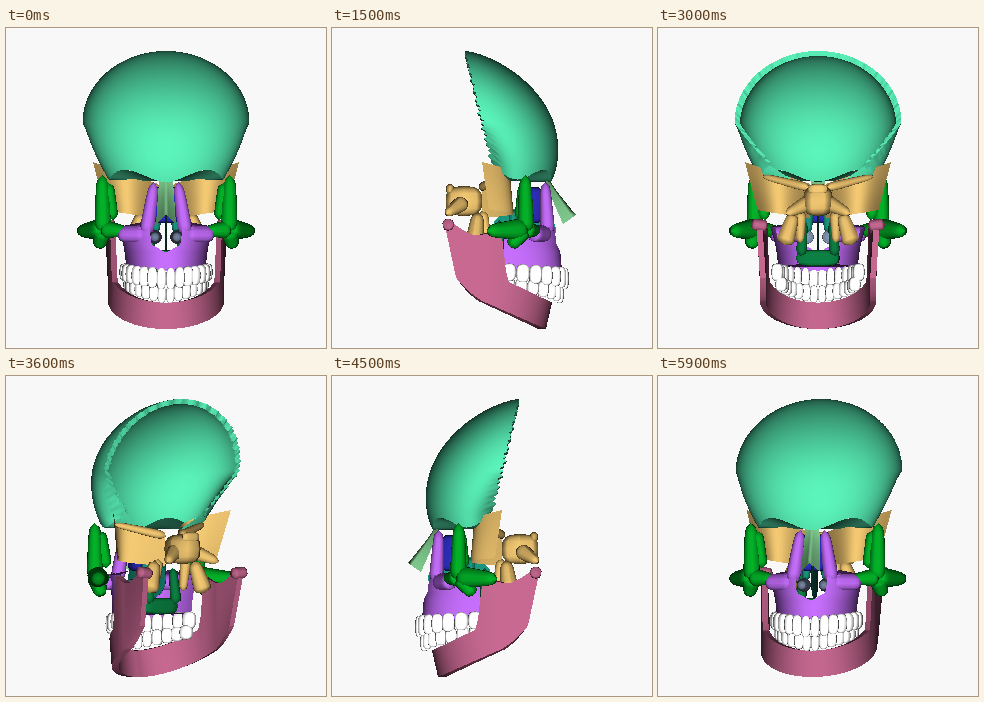
These frames come from a looping animation (320 by 320 pixels, 6 s). An HTML page with a canvas:

```html
<!DOCTYPE html>
<html>
<head>
<meta charset="utf-8">
<style>
html, body { margin: 0; width: 100%; height: 100%; overflow: hidden; background: #f8f8f8; }
canvas { display: block; width: 320px; height: 320px; }
</style>
</head>
<body>
<canvas id="stage" width="320" height="320"></canvas>
<script>
const SIZE = 320, STEPS = 60, STEP_MS = 100, QUARTER = Math.PI / 2;
const ctx = document.getElementById('stage').getContext('2d');
const image = ctx.createImageData(SIZE, SIZE);
const pixels = new Uint32Array(image.data.buffer);
const depth = new Float32Array(SIZE * SIZE);

const TEAL = [92, 245, 188], TAN = [246, 203, 116], GREEN = [4, 182, 42], PURPLE = [200, 112, 255],
  ROSE = [200, 106, 146], NAVY = [46, 46, 185], SAGE = [146, 230, 162], PALATINE = [14, 130, 68],
  SLATE = [150, 170, 205], VOMER = [28, 150, 128], IVORY = [340, 340, 340];

const vertices = [], triangles = [];
const { sin, cos, hypot, abs, min, max, sqrt, PI } = Math;
const lerp = (a, b, t) => a + (b - a) * t;
const mix = (p, q, t) => p.map((a, i) => lerp(a, q[i], t));
const ramp = (v, from, to) => max(0, min(1, (v - from) / (to - from)));
const flip = ([x, y, z]) => [-x, y, z];
const cross = (p, q) => [p[1] * q[2] - p[2] * q[1], p[2] * q[0] - p[0] * q[2], p[0] * q[1] - p[1] * q[0]];
const unit = p => { const len = hypot(...p) || 1; return p.map(v => v / len); };

function addTriangle(color, a, b, c) {
  const normal = cross([b.x - a.x, b.y - a.y, b.z - a.z], [c.x - a.x, c.y - a.y, c.z - a.z]);
  for (const p of [a, b, c]) p.normal = p.normal.map((v, i) => v + normal[i]);
  triangles.push({ color, a, b, c });
}

// Grid mesh of a parametric surface
function surface(color, nu, nv, place) {
  const grid = [], first = vertices.length;
  for (let i = 0; i <= nu; i++) {
    grid.push([]);
    for (let j = 0; j <= nv; j++) {
      const [x, y, z] = place(i / nu, j / nv);
      grid[i].push({ x, y, z, normal: [0, 0, 0] });
    }
    vertices.push(...grid[i]);
  }
  for (let i = 0; i < nu; i++) for (let j = 0; j < nv; j++) {
    addTriangle(color, grid[i][j], grid[i + 1][j], grid[i + 1][j + 1]);
    addTriangle(color, grid[i][j], grid[i + 1][j + 1], grid[i][j + 1]);
  }
  for (const p of vertices.slice(first)) p.normal = unit(p.normal);
}

function pair(color, nu, nv, place) {
  surface(color, nu, nv, place);
  surface(color, nu, nv, (u, v) => flip(place(u, v)));
}

// Superellipsoid; a low power makes it boxy
function blob(color, [cx, cy, cz], [rx, ry, rz], power = 1, turn = 0) {
  const soft = v => Math.sign(v) * abs(v) ** power;
  surface(color, 10, 8, (u, v) => {
    const a = u * PI * 2, b = (v - 0.5) * PI;
    const x = rx * soft(cos(a)) * soft(cos(b)), z = rz * soft(sin(a)) * soft(cos(b));
    return [cx + x * cos(turn) + z * sin(turn), cy + ry * soft(sin(b)), cz + z * cos(turn) - x * sin(turn)];
  });
}

// Tapered rod with rounded ends, on both sides of the face
function rod(color, from, to, r0, r1) {
  const axis = mix(to, from, 0).map((v, i) => v - from[i]);
  const side = unit(cross(axis, [0.3, 0.2, 1])), up = unit(cross(axis, side));
  pair(color, 12, 12, (u, v) => {
    const r = lerp(r0, r1, v) * sqrt(1 - abs(2 * v - 1) ** 6), a = u * PI * 2;
    return mix(from, to, v).map((p, i) => p + r * (cos(a) * side[i] + sin(a) * up[i]));
  });
}

// Forehead shell, open along the coronal suture; inset gives the inner wall
function shell(u, v, inset) {
  const edge = abs(u), top = 23 + inset;
  const bottom = 148 + 6 * cos(7.85 * edge) - 11 * edge ** 6;
  const y = lerp(top, bottom, v ** 1.6);
  const arc = span => sqrt(1 - (1 - min(1, (y - top) / span)) ** 2);
  const temple = 1 - 0.36 * edge ** 8 * ramp(y, 95, 140);
  const width = ((83.5 - inset) * arc(72) - 0.006 * max(0, y - 95) ** 2) * temple;
  const front = -27 + (93 - inset) * arc(97) ** 1.35 - 0.008 * max(0, y - 125) ** 2;
  const back = -27 + (y - 23) * 0.24;
  const jag = edge > 0.999 ? 1.8 * sin(v * 190) + sin(v * 71) : 0;
  return [width * sin(u * QUARTER), y, back + (front - back) * cos(u * QUARTER) + jag];
}

function buildFrontal() {
  for (const inset of [0, 5]) surface(TEAL, 40, 60, (u, v) => shell(u * 2 - 1, v, inset));
  pair(TEAL, 1, 60, (u, v) => shell(1, v, u * 5));
  surface(TEAL, 32, 4, (u, v) => {
    const rim = shell(u * 2 - 1, 1, 0);
    return mix(rim, [rim[0] * 0.5, 153, 8], v);
  });
}

function buildSphenoid() {
  pair(TAN, 16, 8, (u, v) => [
    lerp(8, 73, u) * (1 - 0.17 * v * u),
    lerp(lerp(156, 134, u), 190 - 8 * u, v),
    -10 + 28 * sin(PI * u) + 7 * u * v
  ]);
  blob(TAN, [0, 173, -28], [15, 15, 19], 0.7);
  blob(TAN, [0, 161, -42], [10, 5, 4], 0.7);
  rod(TAN, [8, 160, -12], [56, 148, 12], 5, 3);
  rod(TAN, [8, 174, -28], [32, 186, -46], 9, 4);
  rod(TAN, [17, 183, -10], [18, 215, -4], 6, 4);
  rod(TAN, [24, 185, -14], [34, 217, -18], 6, 10);
}

function buildCheeks() {
  const hub = [63, 201, 32];
  rod(GREEN, [63, 205, 34], [64, 147, 33], 9, 6);
  rod(GREEN, [60, 201, 34], [87, 203, -5], 12, 6);
  rod(GREEN, hub, [40, 203, 46], 10, 5);
  rod(GREEN, hub, [67, 219, 18], 10, 6);
  rod(GREEN, [58, 155, 32], [53, 192, 28], 6, 6);
}

// Upper jaw wall around the dental arch, with the nasal opening left out
function jawWall(u, v) {
  const angle = lerp(0.35 * ramp(v, 0.42, 0.6), QUARTER, u);
  return [(40 + 8 * v * v) * sin(angle), lerp(243, 199, v), 12 + (58 - 4 * v) * cos(angle)];
}

function buildFace() {
  pair(PURPLE, 16, 12, jawWall);
  pair(PURPLE, 16, 3, (u, v) => mix(jawWall(u, 1), [24, 194, 26], v));
  pair(PURPLE, 12, 2, (u, v) => mix(jawWall(u, 0.1), [0, 234, 16], v));
  rod(PURPLE, [20, 207, 56], [12, 154, 53], 8, 5);
  rod(PURPLE, [18, 206, 54], [48, 206, 40], 9, 8);
  surface(SAGE, 8, 8, (u, v) => {
    const side = u * 2 - 1, out = abs(side);
    return [side * (7 + 3 * v), 153 + 34 * v + 9 * out * v, 58 + 26 * v ** 1.1 - out * (4 + 9 * v)];
  });
  blob(NAVY, [0, 177, 39], [14, 18, 11], 0.35);
  blob(VOMER, [0, 202, 32], [1.5, 22, 34]);
  blob(PALATINE, [0, 230, 10], [22, 8, 5], 0.6);
  rod(PALATINE, [14, 192, 8], [17, 228, 6], 4, 6);
  rod(VOMER, [9, 182, 22], [10, 204, 20], 5, 4);
  rod(SLATE, [11, 209, 58], [11, 209, 24], 4, 8);
}

// Lower jaw: elliptical body running into a straight ramus
function mandible(u, v) {
  const turn = min(1, u / 0.6) * QUARTER, ramus = ramp(u, 0.6, 1);
  const z = -10 + 70 * cos(turn) - 38 * ramus;
  const notch = 198 + 9 * sin(PI * ramp(z, 12, -40)) - 5 * ramp(z, -20, -48);
  const top = lerp(252 + (z - 13) * 0.48, notch, ramp(z, 15, 9));
  const bottom = 301 - 0.4 * (60 - z) - 8 * ramus ** 2;
  return [58 * sin(turn) + 4 * ramus * (1 - v), lerp(top, bottom, v), z + v * (12 * ramus - 6 * cos(turn))];
}

function buildMandible() {
  const inner = (u, v) => {
    const [x, y, z] = mandible(u, v);
    return [x * 0.9, y, z - 9 * (1 - u)];
  };
  pair(ROSE, 60, 8, mandible);
  pair(ROSE, 60, 8, inner);
  for (const end of [0, 1]) pair(ROSE, 60, 1, (u, v) => mix(mandible(u, end), inner(u, end), v));
  pair(ROSE, 8, 1, (u, v) => mix(mandible(1, u), inner(1, u), v));
  rod(ROSE, [50, 198, -43], [67, 196, -44], 6, 6);
}

function buildTeeth() {
  const rows = [
    { rx: 41, rz: 63, front: 251, back: 244, tall: 11 },
    { rx: 37, rz: 58, front: 267, back: 256, tall: 9 }
  ];
  for (const { rx, rz, front, back, tall } of rows) for (let i = 0; i < 14; i++) {
    const angle = (i - 6.5) * PI / 14, depthward = abs(angle) / 1.5;
    const dx = rx * cos(angle), dz = -rz * sin(angle);
    blob(IVORY, [rx * sin(angle), lerp(front, back, depthward), 10 + rz * cos(angle)],
      [hypot(dx, dz) * PI / 28, tall * (1 - 0.2 * depthward), 4 + 2 * depthward], 0.7, Math.atan2(-dz, dx));
  }
}

function fillTriangle({ color, a, b, c }) {
  const area = (b.sx - a.sx) * (c.y - a.y) - (c.sx - a.sx) * (b.y - a.y);
  if (abs(area) < 1e-6) return;
  const x0 = Math.ceil(min(a.sx, b.sx, c.sx) - 0.5), x1 = max(a.sx, b.sx, c.sx) - 0.5;
  const y0 = Math.ceil(min(a.y, b.y, c.y) - 0.5), y1 = max(a.y, b.y, c.y) - 0.5;
  for (let y = y0; y <= y1; y++) for (let x = x0; x <= x1; x++) {
    const px = x + 0.5 - a.sx, py = y + 0.5 - a.y;
    const wb = (px * (c.y - a.y) - (c.sx - a.sx) * py) / area;
    const wc = ((b.sx - a.sx) * py - px * (b.y - a.y)) / area;
    const wa = 1 - wb - wc;
    if (wa < 0 || wb < 0 || wc < 0) continue;
    const near = wa * a.near + wb * b.near + wc * c.near, k = y * SIZE + x;
    if (near <= depth[k]) continue;
    depth[k] = near;
    const light = 0.15 + 0.85 * abs(wa * a.facing + wb * b.facing + wc * c.facing);
    const [red, green, blue] = color.map(v => min(255, v * light));
    pixels[k] = (255 << 24 | blue << 16 | green << 8 | red) >>> 0;
  }
}

function draw(step) {
  const angle = step / STEPS * PI * 2, c = cos(angle), s = sin(angle);
  pixels.fill(0xfff8f8f8);
  depth.fill(-1e9);
  for (const p of vertices) {
    p.sx = SIZE / 2 + p.x * c + p.z * s;
    p.near = p.z * c - p.x * s;
    p.facing = p.normal[2] * c - p.normal[0] * s;
  }
  triangles.forEach(fillTriangle);
  ctx.putImageData(image, 0, 0);
}

buildFrontal();
buildSphenoid();
buildCheeks();
buildFace();
buildMandible();
buildTeeth();

let shown = -1;
const start = performance.now();
function tick() {
  const step = Math.floor((performance.now() - start) / STEP_MS) % STEPS;
  if (step !== shown) draw(shown = step);
  requestAnimationFrame(tick);
}
tick();
</script>
</body>
</html>
```
